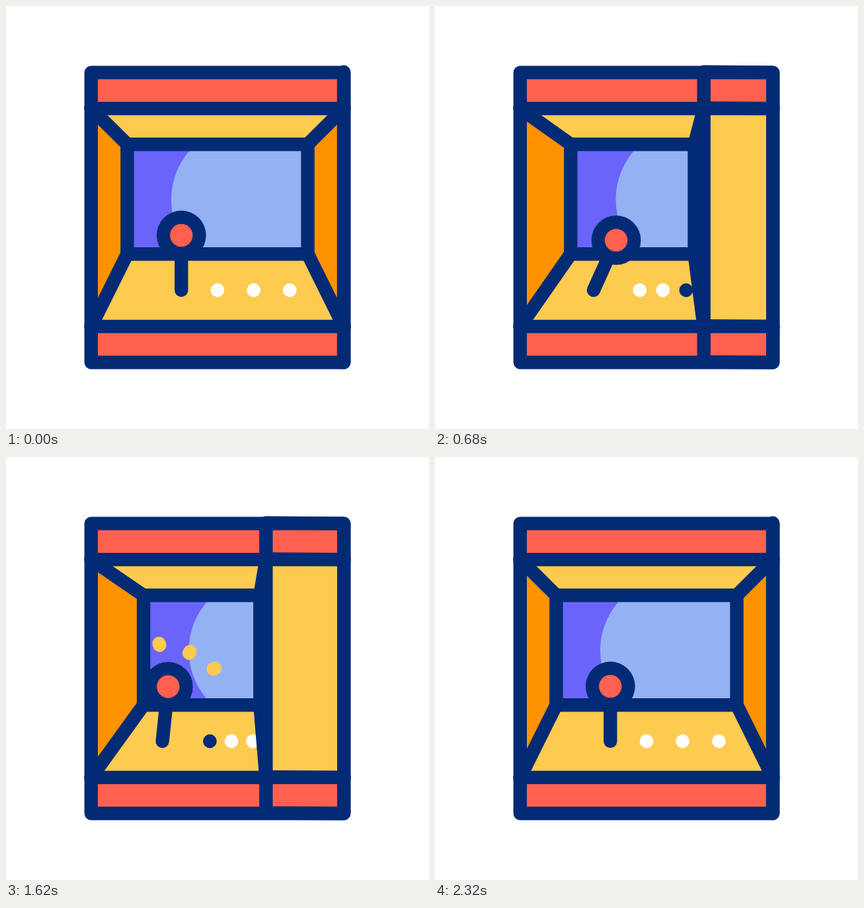
Write an HTML page with a canvas that moves like this. It is 640x640 px and loops after 2400 ms.

```html
<!DOCTYPE html>
<html lang="en">
<head>
<meta charset="utf-8">
<title>Arcade cabinet</title>
<style>
  html, body { margin: 0; width: 100%; height: 100%; overflow: hidden; background: #fff; }
  canvas { display: block; width: 640px; height: 640px; }
</style>
</head>
<body>
<canvas id="stage" width="640" height="640"></canvas>
<script>
const ctx = document.getElementById('stage').getContext('2d');
const LOOP = 2400, STROKE = 20.4;
const NAVY = '#032b75', RED = '#ff6150', YELLOW = '#fdcb50', ORANGE = '#ff9200',
      PURPLE = '#6b64fa', BLUE = '#94b1f4', WHITE = '#fff';
const LEFT = 128.8, RIGHT = 511.2, TOP = 100.6, BOTTOM = 539.3;
const BAND1 = 155.1, BAND2 = 484.9, SCREEN1 = 209.3, SCREEN2 = 375.2;

// Joystick tilt: time, degrees
const TILT = [[0, 0], [580, 30], [1060, -20], [1445, 20], [1873, -18], [2320, 0]];
// Sparks: from x, y to x, y
const SPARKS = [[232.5, 285, 212, 222], [277, 297, 307.5, 240], [313.5, 320.8, 367, 302]];

const lerp = (a, b, p) => a + (b - a) * p;
const part = (t, a, b) => Math.min(1, Math.max(0, (t - a) / (b - a)));
const smooth = s => s * s * (3 - 2 * s);

// cubic-bezier(a, 0, 1 - a, 1)
function ease(s, a = 0.812) {
  let lo = 0, hi = 1;
  for (let i = 0; i < 30; i++) {
    const u = (lo + hi) / 2, v = 1 - u;
    const x = 3 * a * u * v * v + 3 * (1 - a) * u * u * v + u * u * u;
    if (x < s) lo = u; else hi = u;
  }
  return smooth(lo);
}

function tiltAt(t) {
  for (let i = 1; i < TILT.length; i++) {
    const [t0, a] = TILT[i - 1], [t1, b] = TILT[i];
    if (t < t1) return lerp(a, b, smooth(part(t, t0, t1)));
  }
  return 0;
}

function trace(pts) {
  ctx.beginPath();
  for (let i = 0; i < pts.length; i += 2) ctx.lineTo(pts[i], pts[i + 1]);
}
function fill(color, ...pts) {
  trace(pts);
  ctx.fillStyle = color;
  ctx.fill();
}
function line(color, ...pts) {
  trace(pts);
  ctx.strokeStyle = color;
  ctx.stroke();
}
function loop(...pts) {
  trace(pts);
  ctx.closePath();
  ctx.strokeStyle = NAVY;
  ctx.stroke();
}
function disc(color, x, y, r) {
  ctx.beginPath();
  ctx.arc(x, y, r, 0, 2 * Math.PI);
  ctx.fillStyle = color;
  ctx.fill();
}

function drawScreen(l, r, p) {
  ctx.save();
  trace([l, SCREEN1, r, SCREEN1, r, SCREEN2, l, SCREEN2]);
  ctx.clip();
  ctx.fillStyle = PURPLE;
  ctx.fillRect(l, SCREEN1, r - l, SCREEN2 - SCREEN1);
  const x = lerp(362, 393, p);
  disc(BLUE, x, 292.7, 112);
  ctx.fillRect(x, SCREEN1, 200, SCREEN2 - SCREEN1);
  ctx.restore();
}

function drawLights(t, p) {
  for (let i = 0; i < 3; i++) {
    const on = 1220 - 400 * i;
    const lit = t >= on && t < on + 560;
    disc(lit ? NAVY : WHITE, lerp(320 + 54.7 * i, 306.5 + 28.8 * i, p), 430, 10.4);
  }
}

function drawPanel(x) {
  const y1 = TOP - 0.8, y2 = BAND1 - 0.6, y3 = BAND2 - 0.7, y4 = BOTTOM - 0.8;
  fill(RED, x, y1, RIGHT, TOP, RIGHT, BOTTOM, x, y4);
  fill(YELLOW, x, y2, RIGHT, BAND1, RIGHT, BAND2, x, y3);
  line(NAVY, x, y2, RIGHT, BAND1);
  line(NAVY, x, y3, RIGHT, BAND2);
  loop(x, y1, RIGHT, TOP, RIGHT, BOTTOM, x, y4);
}

function drawSparks(t) {
  const head = smooth(part(t, 1590, 1830)), tail = smooth(part(t, 1610, 1900));
  if (head <= tail) return;
  for (const [x0, y0, x1, y1] of SPARKS) {
    line(YELLOW, lerp(x0, x1, tail), lerp(y0, y1, tail), lerp(x0, x1, head), lerp(y0, y1, head));
  }
}

function drawStick(t, p) {
  const a = tiltAt(t) * Math.PI / 180, x = lerp(265.3, 231.8, p), y = 430;
  const bx = x + 83 * Math.sin(a), by = y - 83 * Math.cos(a);
  line(NAVY, x, y, bx, by);
  disc(NAVY, bx, by, 37.4);
  disc(RED, bx, by, 17.2);
}

function draw(t) {
  const p = t < 1200 ? ease(t / 1200) : 1 - ease(part(t, 1200, 2320));
  const edge = lerp(511, 373.5, p), l = lerp(183.4, 212.3, p), r = lerp(456.6, 372.1, p);

  ctx.fillStyle = WHITE;
  ctx.fillRect(0, 0, 640, 640);
  ctx.lineWidth = STROKE;
  ctx.lineCap = ctx.lineJoin = 'round';

  fill(RED, LEFT, TOP, RIGHT, TOP, RIGHT, BOTTOM, LEFT, BOTTOM);
  fill(YELLOW, LEFT, BAND1, RIGHT, BAND1, RIGHT, BAND2, LEFT, BAND2);
  fill(ORANGE, LEFT, BAND1, l, SCREEN1, l, SCREEN2, LEFT, BAND2);
  fill(ORANGE, edge, BAND1, r, SCREEN1, r, SCREEN2, edge, BAND2);
  drawScreen(l, r, p);
  drawLights(t, p);

  loop(l, SCREEN1, r, SCREEN1, r, SCREEN2, l, SCREEN2);
  line(NAVY, LEFT, BAND1, l, SCREEN1);
  line(NAVY, LEFT, BAND2, l, SCREEN2);
  line(NAVY, edge, BAND1, r, SCREEN1);
  line(NAVY, edge, BAND2, r, SCREEN2);

  drawPanel(edge);
  for (const y of [BAND1, BAND2]) line(NAVY, LEFT - 0.5, y, RIGHT + 0.5, y);
  loop(LEFT, TOP, RIGHT, TOP, RIGHT, BOTTOM, LEFT, BOTTOM);

  drawSparks(t);
  drawStick(t, p);
}

function tick() {
  draw(performance.now() % LOOP);
  requestAnimationFrame(tick);
}
tick();
</script>
</body>
</html>
```
